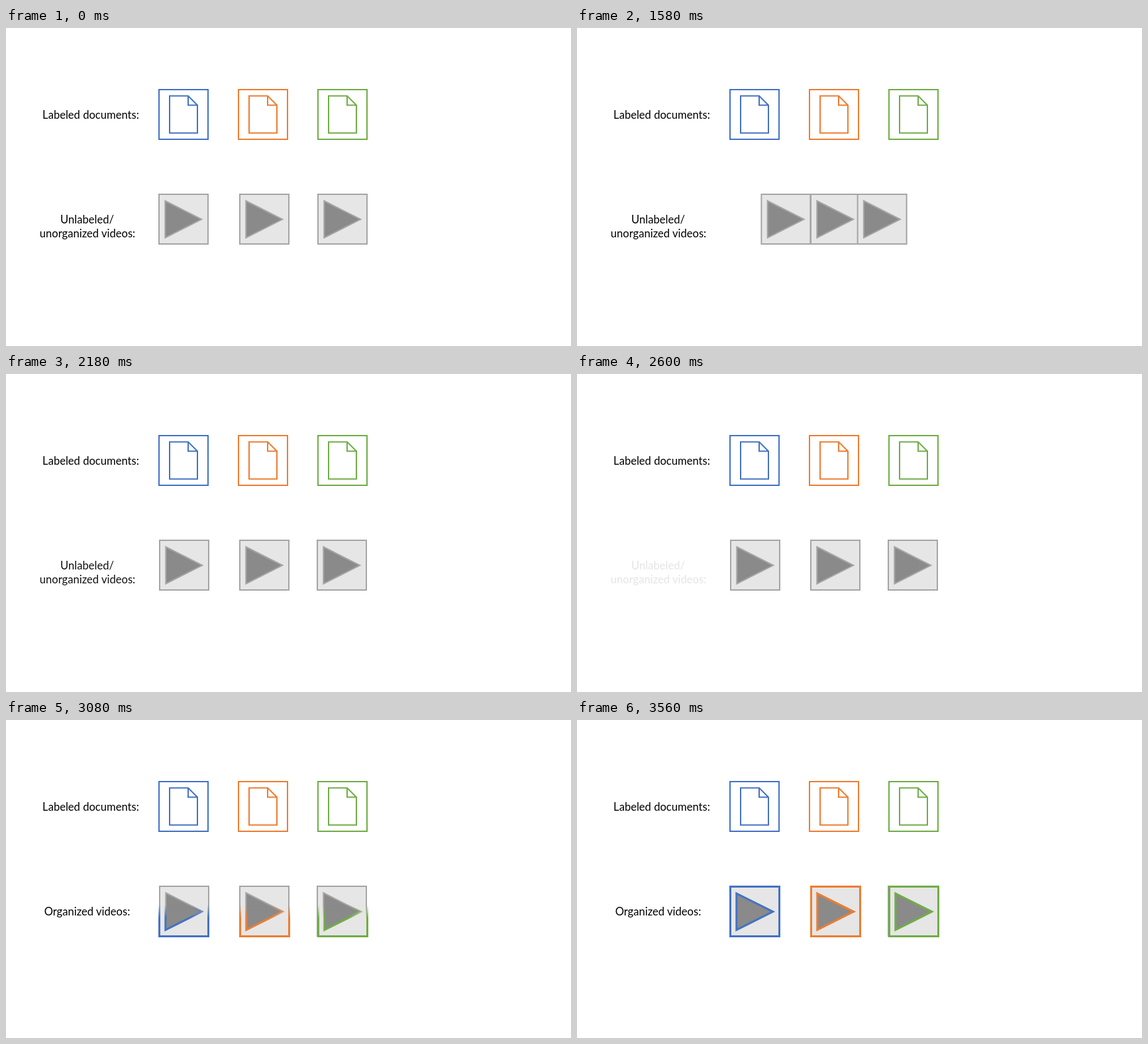
An HTML page that plays this animation: 853x480 px, repeating every 4830 ms.

```html
<!DOCTYPE html>
<html lang="en">
<head>
<meta charset="utf-8">
<title>Organizing videos</title>
<style>
  html, body { margin: 0; width: 100%; height: 100%; overflow: hidden; background: #fff; }
  svg { display: block; width: 853px; height: 480px; }
  text { font: 16.6px Lato, sans-serif; text-anchor: middle; fill: #000; }
  .doc { fill: none; stroke: currentColor; stroke-width: 2; }
  .box { fill: #e6e6e6; }
  .play { fill: #8a8a8a; }
  .box, .play { stroke: currentColor; stroke-width: 2; stroke-miterlimit: 8; }
  .bold .box, .bold .play { stroke-width: 3; }
  .grey { color: #a5a5a5; }
  .blue { color: #4472c4; }
  .orange { color: #ed7d31; }
  .green { color: #70ad47; }
</style>
</head>
<body>
<svg viewBox="0 0 853 480">
  <defs>
    <g id="doc" class="doc">
      <rect x="231" y="93" width="74" height="75"/>
      <path d="M247 102.5h28l14 14v42h-42zM275 102.5v14h14"/>
    </g>
    <g id="video">
      <rect class="box" x="231" y="251" width="74" height="75"/>
      <path class="play" d="M240.3 261l55 27.8l-55 27.8z"/>
    </g>
    <linearGradient id="edge" gradientUnits="userSpaceOnUse" x1="0" y1="-10" x2="0" y2="10">
      <stop offset="0" stop-color="#000"/>
      <stop offset="1" stop-color="#fff"/>
    </linearGradient>
    <mask id="wipe" maskUnits="userSpaceOnUse" x="0" y="0" width="853" height="480">
      <rect width="853" height="480" fill="url(#edge)"/>
    </mask>
  </defs>

  <text x="128" y="137">Labeled documents:</text>
  <use href="#doc" class="blue"/>
  <use href="#doc" class="orange" x="120"/>
  <use href="#doc" class="green" x="240"/>

  <g id="before">
    <text x="122.5" y="295">Unlabeled/</text>
    <text x="123" y="316">unorganized videos:</text>
  </g>
  <text id="after" x="122.5" y="295">Organized videos:</text>

  <g class="grey">
    <use id="first" href="#video"/>
    <use href="#video" x="122"/>
    <use id="last" href="#video" x="240"/>
  </g>
  <g id="sorted" class="bold" mask="url(#wipe)"></g>
</svg>
<script>
  const LOOP = 4830, START = 1340, END = 3560, STEP = 60;
  const $ = id => document.getElementById(id);
  const part = (t, from, length) => Math.min(1, Math.max(0, (t - from) / length));
  const ease = p => p < 0.5 ? 2 * p * p : 1 - 2 * (1 - p) ** 2;

  $('sorted').innerHTML = [['blue', 0], ['orange', 122], ['green', 240]].map(([color, x]) =>
    `<g class="${color}" transform="translate(${x} 0)">
      <rect class="box" x="231.5" y="251.5" width="74" height="75"/>
      <path class="play" d="M240.8 261.8l55 27.5l-55 27.5z"/>
    </g>`).join('');

  // The picture advances in fixed steps between two holds.
  function stepped(t) {
    if (t < START) return 0;
    return Math.min(END, START + STEP * Math.floor((t - START) / STEP));
  }

  function draw(t) {
    const swap = 239 * ease(part(t, 1325, 810));
    $('first').setAttribute('x', swap);
    $('last').setAttribute('x', 240 - swap);

    $('before').style.opacity = 1 - part(t, 2150, 500);

    const fly = part(t, 2655, 175);
    $('after').setAttribute('y', 295 + 205 * (1 - fly));
    $('after').style.visibility = fly > 0 ? 'visible' : 'hidden';

    const wipe = part(t, 2830, 500);
    $('edge').setAttribute('gradientTransform', `translate(0 ${338 - 98 * wipe})`);
    $('sorted').style.visibility = wipe > 0 ? 'visible' : 'hidden';
  }

  const origin = performance.now();
  function tick() {
    draw(stepped((performance.now() - origin) % LOOP));
    requestAnimationFrame(tick);
  }
  tick();
</script>
</body>
</html>
```
